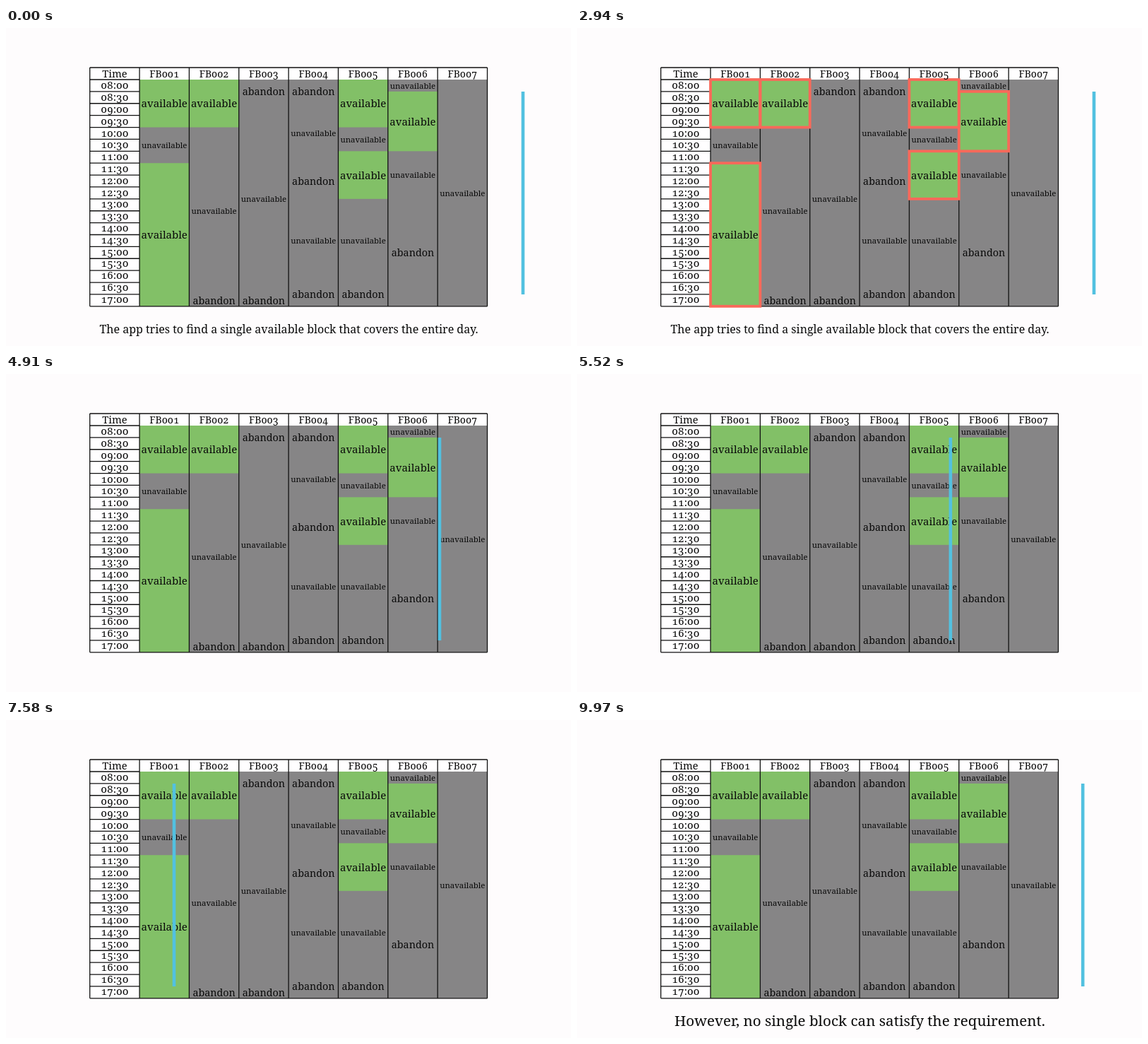
These frames come from a looping animation (800x450 px, 10 s). An HTML page:

```html
<!DOCTYPE html>
<html lang="en">
<head>
<meta charset="utf-8">
<title>Block search</title>
<style>
html, body { margin: 0; width: 100%; height: 100%; overflow: hidden; background: #fefcfd; }
svg { display: block; width: 800px; height: 450px; }
text { font-family: "Noto Serif", Georgia, serif; font-variant-numeric: oldstyle-nums; text-anchor: middle; fill: #0a0a0a; }
</style>
</head>
<body>
<svg viewBox="0 0 800 450">
  <g id="table"></g>
  <g id="frames" fill="none" stroke="#f9695a" stroke-width="3.8"></g>
  <g id="labels"></g>
  <rect id="scan" y="90" width="4.6" height="287" fill="#52c1e0"/>
  <rect id="parked" x="713.9" y="90" width="4.6" height="287" fill="#52c1e0"/>
  <text id="intro" x="400.5" y="432" font-size="16">The app tries to find a single available block that covers the entire day.</text>
  <text id="result" x="400.5" y="433" font-size="20.6">However, no single block can satisfy the requirement.</text>
</svg>
<script>
const $ = id => document.getElementById(id);
const LEFT = 118.7, COL = 70.35, TOP = 56, HEAD = 73, BOTTOM = 393.8, SLOTS = 19;
const colX = i => LEFT + COL * i;
const slotY = i => HEAD + (BOTTOM - HEAD) * i / SLOTS;

// Half-hour slots per state, one column per entry
const plan = ["A4 U3 A12", "A4 U14 X1", "X2 U16 X1", "X2 U5 X3 U7 X2",
              "A4 U2 A4 U7 X2", "U1 A5 U4 X9", "U19"];
const states = {
  A: { word: "available", size: 15 },
  U: { word: "unavailable", size: 11.4 },
  X: { word: "abandon", size: 14.3 }
};

function add(parent, tag, attrs, content = "") {
  const el = document.createElementNS("http://www.w3.org/2000/svg", tag);
  for (const k in attrs) el.setAttribute(k, attrs[k]);
  el.textContent = content;
  $(parent).append(el);
}
const line = (x1, y1, x2, y2) =>
  add("table", "line", { x1, y1, x2, y2, stroke: "#111", "stroke-width": 1.3 });
const label = (col, midY, size, str) =>
  add("labels", "text", { x: colX(col + 0.5), y: midY + size * 0.35, "font-size": size }, str);

add("table", "rect", { x: LEFT, y: TOP, width: COL * 8, height: BOTTOM - TOP, fill: "#fffeff" });
add("table", "rect", { x: colX(1), y: HEAD, width: COL * 7, height: BOTTOM - HEAD, fill: "#868586" });

label(0, 65, 14.6, "Time");
plan.forEach((runs, i) => {
  const col = i + 1;
  label(col, 64.7, 14, "FB00" + col);
  let slot = 0;
  for (const run of runs.split(" ")) {
    const { word, size } = states[run[0]], count = +run.slice(1);
    const y = slotY(slot), height = slotY(slot + count) - y;
    if (run[0] === "A") {
      const box = { x: colX(col), y, width: COL, height };
      add("table", "rect", { ...box, fill: "#82c067" });
      add("frames", "rect", box);
    }
    label(col, y + height / 2 + 0.4, size, word);
    slot += count;
  }
});

for (let i = 0; i <= 8; i++) line(colX(i), TOP, colX(i), BOTTOM);
line(LEFT, TOP, colX(8), TOP);
line(LEFT, BOTTOM, colX(8), BOTTOM);
for (let i = 0; i < SLOTS; i++) {
  line(LEFT, slotY(i), colX(1), slotY(i));
  const hour = String(8 + (i >> 1)).padStart(2, "0");
  label(0, 81.2 + i * 16.8, 15, hour + (i % 2 ? ":30" : ":00"));
}

// Scan bar key points: time, centre x
const path = [[4065, 732], [5520, 529], [6390, 426], [7885, 190]];
const ramp = (t, from, len) => Math.min(1, Math.max(0, (t - from) / len));

function scanX(t) {
  let x = path[0][1];
  for (let i = 1; i < path.length; i++) {
    const [t0, x0] = path[i - 1], [t1, x1] = path[i];
    x += (x1 - x0) * ramp(t, t0, t1 - t0);
  }
  return x;
}

const blinkOff = (t, start, end) => t >= start && t < end && (t - start) % 1000 >= 500;
const fade = (id, opacity) => $(id).setAttribute("opacity", opacity);

function draw(t) {
  const next = ramp(t, 8820, 500);
  const framed = t >= 670 && !blinkOff(t, 670, 2670) && !blinkOff(t, 3940, 7940);
  $("scan").setAttribute("x", scanX(t) - 2.3);
  fade("frames", framed ? 1 - next : 0);
  fade("scan", 1 - next);
  fade("parked", next);
  fade("intro", 1 - ramp(t, 2970, 500));
  fade("result", next);
}

const start = performance.now();
function tick() {
  draw((performance.now() - start) % 10000);
  requestAnimationFrame(tick);
}
tick();
</script>
</body>
</html>
```
